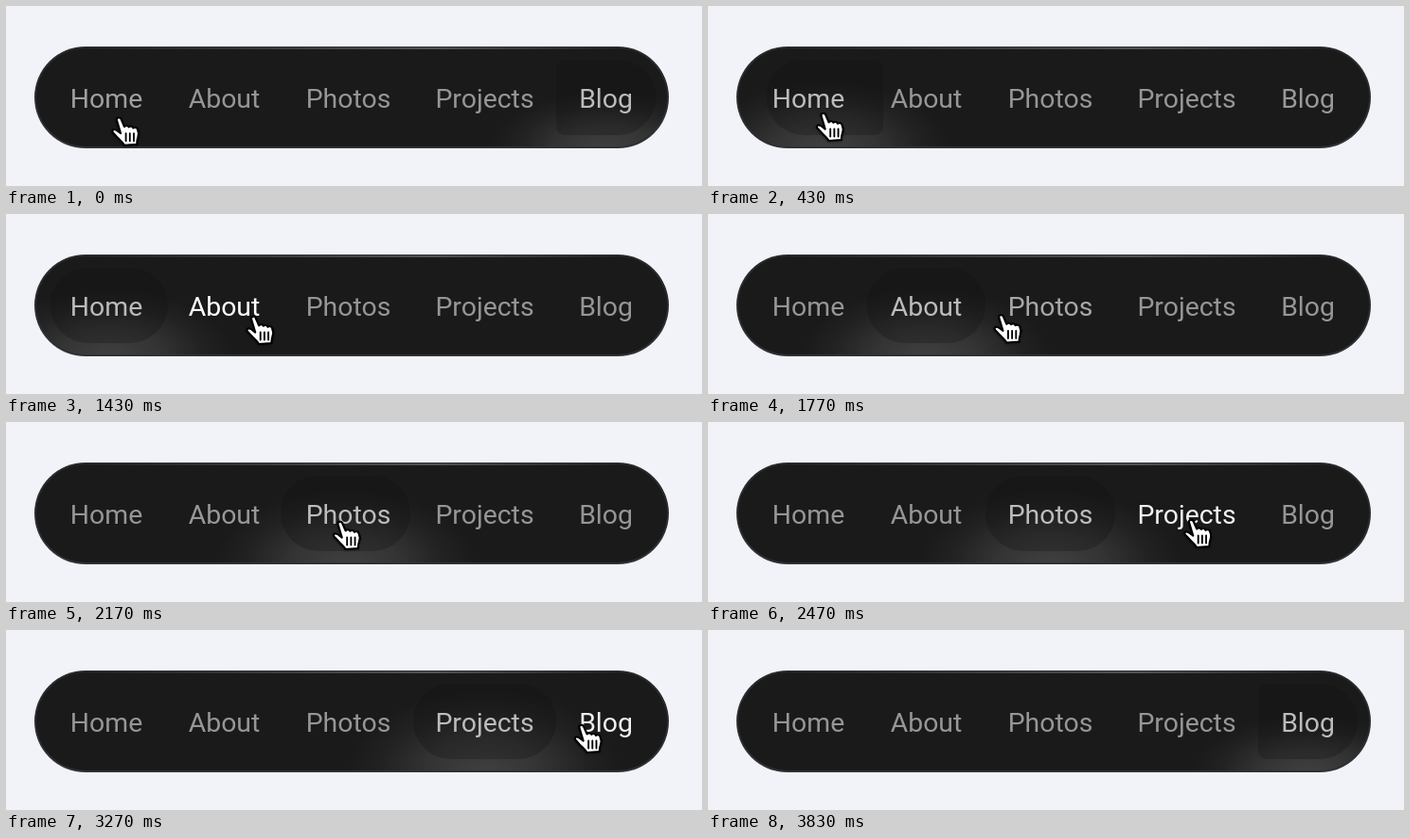
Animation of 735x191 px, one loop 5130 ms. Source, as an HTML page:

```html
<!DOCTYPE html>
<html lang="en">
<head>
<meta charset="utf-8">
<title>Navigation bar</title>
<style>
html, body { margin: 0; width: 100%; height: 100%; overflow: hidden; background: #f2f3f9; }
svg { display: block; width: 735px; height: 191px; }
text { font: 400 28.4px Roboto, sans-serif; text-anchor: middle; }
#hand { filter: drop-shadow(0 1px 1px rgba(0, 0, 0, .35)); }
</style>
</head>
<body>
<svg viewBox="0 0 735 191">
  <defs>
    <linearGradient id="edge" x1="0" y1="0" x2="0" y2="1">
      <stop offset="0" stop-color="#25282a"/>
      <stop offset="1" stop-color="#303133"/>
    </linearGradient>
    <linearGradient id="shine">
      <stop offset="0" stop-color="#7b878a" stop-opacity="0"/>
      <stop offset=".65" stop-color="#7b878a"/>
      <stop offset="1" stop-color="#7b878a" stop-opacity="0"/>
    </linearGradient>
    <radialGradient id="light">
      <stop offset="0" stop-color="#fff" stop-opacity=".165"/>
      <stop offset=".4" stop-color="#fff" stop-opacity=".115"/>
      <stop offset=".75" stop-color="#fff" stop-opacity=".035"/>
      <stop offset="1" stop-color="#fff" stop-opacity="0"/>
    </radialGradient>
    <clipPath id="inside"><rect x="32" y="45" width="666" height="104" rx="52"/></clipPath>
  </defs>
  <rect x="30" y="43" width="670" height="108" rx="54" fill="url(#edge)"/>
  <rect x="32" y="45" width="666" height="104" rx="52" fill="#1a1a1a"/>
  <rect x="84" y="44.5" width="564" height="1" fill="url(#shine)"/>
  <g clip-path="url(#inside)"><ellipse id="glow" cy="151" fill="url(#light)"/></g>
  <g id="labels"></g>
  <path id="pill" fill="#101010" fill-opacity=".28"/>
  <g id="hand" stroke="#000" stroke-linecap="round" stroke-linejoin="round">
    <g transform="translate(-1.3 0) scale(1.1 1.02)">
      <path fill="#fff" stroke-width="2" d="M6.2 4.5C5.4 2 9.2.6 10.4 3.2L13.6 11.2C14.4 9.6 17.4 9.8 17.8 11.6C18.8 10.2 21.6 10.6 22 12.6C23.2 11.4 25.8 12 26.2 13.8C27.2 16 27.8 19 26.6 22.6C26 24.6 25.6 25.6 25.6 29.4L13.4 30.4C12.6 28.4 10.6 26.2 8.6 24.2C6.2 22 4.6 19.4 2.6 17.4C1 15.6 2.6 13.4 5 14.4C6.8 15.2 8.4 17 10 18.2Z"/>
      <path fill="none" stroke-width="1.7" d="M15 18v8M18.8 18v8M22.6 18v8"/>
    </g>
  </g>
</svg>
<script>
const LOOP = 5130, FADE = 300, TRAVEL = 330;
const $ = id => document.getElementById(id);
const clamp = v => Math.max(0, Math.min(1, v));
const mix = (a, b, k) => a + (b - a) * k;
const smooth = k => k * k * (3 - 2 * k);

// cubic-bezier(.25, .1, .25, 1)
function ease(x) {
  x = clamp(x);
  const curve = (s, a, b) => 3 * a * s * (1 - s) ** 2 + 3 * b * s * s * (1 - s) + s ** 3;
  let lo = 0, hi = 1;
  for (let i = 0; i < 24; i++) {
    const mid = (lo + hi) / 2;
    if (curve(mid, .25, .25) < x) lo = mid; else hi = mid;
  }
  return curve(lo, .1, 1);
}

// width of each link; when and where the pointer arrives, and when it clicks
const items = [
  { name: 'Home', w: 124, x: 114, y: 112, arrive: 170, click: 200 },
  { name: 'About', w: 125, x: 253.5, y: 107, arrive: 1000, click: 1420 },
  { name: 'Photos', w: 137, x: 345, y: 104, arrive: 1930, click: 1930 },
  { name: 'Projects', w: 151, x: 506, y: 102, arrive: 2500, click: 2845 },
  { name: 'Blog', w: 105, x: 602, y: 99, arrive: 3300, click: 3515 }
];
const last = items.length - 1;
const path = [{ x: 109, y: 121 }, ...items, { x: 698, y: -45, arrive: 3860 }];

let left = 44;
items.forEach((it, i) => {
  it.l = left;
  it.r = left += it.w;
  it.on = it.arrive - 200;
  it.off = i < last ? items[i + 1].click : items[0].click + LOOP;
  it.el = document.createElementNS('http://www.w3.org/2000/svg', 'text');
  it.el.textContent = it.name;
  it.el.setAttribute('x', (it.l + it.r) / 2);
  it.el.setAttribute('y', 108);
  $('labels').append(it.el);
});

function drawPill(l, r, target) {
  const top = 57, bottom = 137, w = r - l;
  const a = target === last ? 9 : 40, b = target === 0 ? 9 : 40;
  $('pill').setAttribute('d',
    `M${l + a} ${top}H${r - b}A${b} ${b} 0 0 1 ${r} ${top + b}V${bottom - b}` +
    `A${b} ${b} 0 0 1 ${r - b} ${bottom}H${l + a}A${a} ${a} 0 0 1 ${l} ${bottom - a}` +
    `V${top + a}A${a} ${a} 0 0 1 ${l + a} ${top}Z`);
  $('glow').setAttribute('cx', (l + r) / 2);
  $('glow').setAttribute('rx', w / 2 + 70);
  $('glow').setAttribute('ry', w * .58);
}

function drawHand(t) {
  let { x, y } = path[0];
  for (const p of path.slice(1)) {
    const k = smooth(clamp((t - p.arrive) / TRAVEL + 1));
    x = mix(x, p.x, k);
    y = mix(y, p.y, k);
  }
  $('hand').setAttribute('transform', `translate(${x} ${y})`);
}

function draw(t) {
  let from = last, to = last, k = 1;
  items.forEach((it, i) => {
    if (t < it.click) return;
    from = to;
    to = i;
    k = ease((t - it.click) / FADE);
  });
  const a = items[from], b = items[to];
  drawPill(mix(a.l, b.l, k), mix(a.r, b.r, k), to);

  for (const it of items) {
    const u = t + LOOP < it.off + FADE ? t + LOOP : t;
    const lit = ease((u - it.on) / FADE) * (1 - ease((u - it.off) / FADE));
    const c = Math.round(mix(150, 255, lit));
    it.el.setAttribute('fill', `rgb(${c},${c},${c})`);
  }
  drawHand(t);
}

const start = performance.now();
function tick() {
  draw((performance.now() - start) % LOOP);
  requestAnimationFrame(tick);
}
tick();
</script>
</body>
</html>
```
